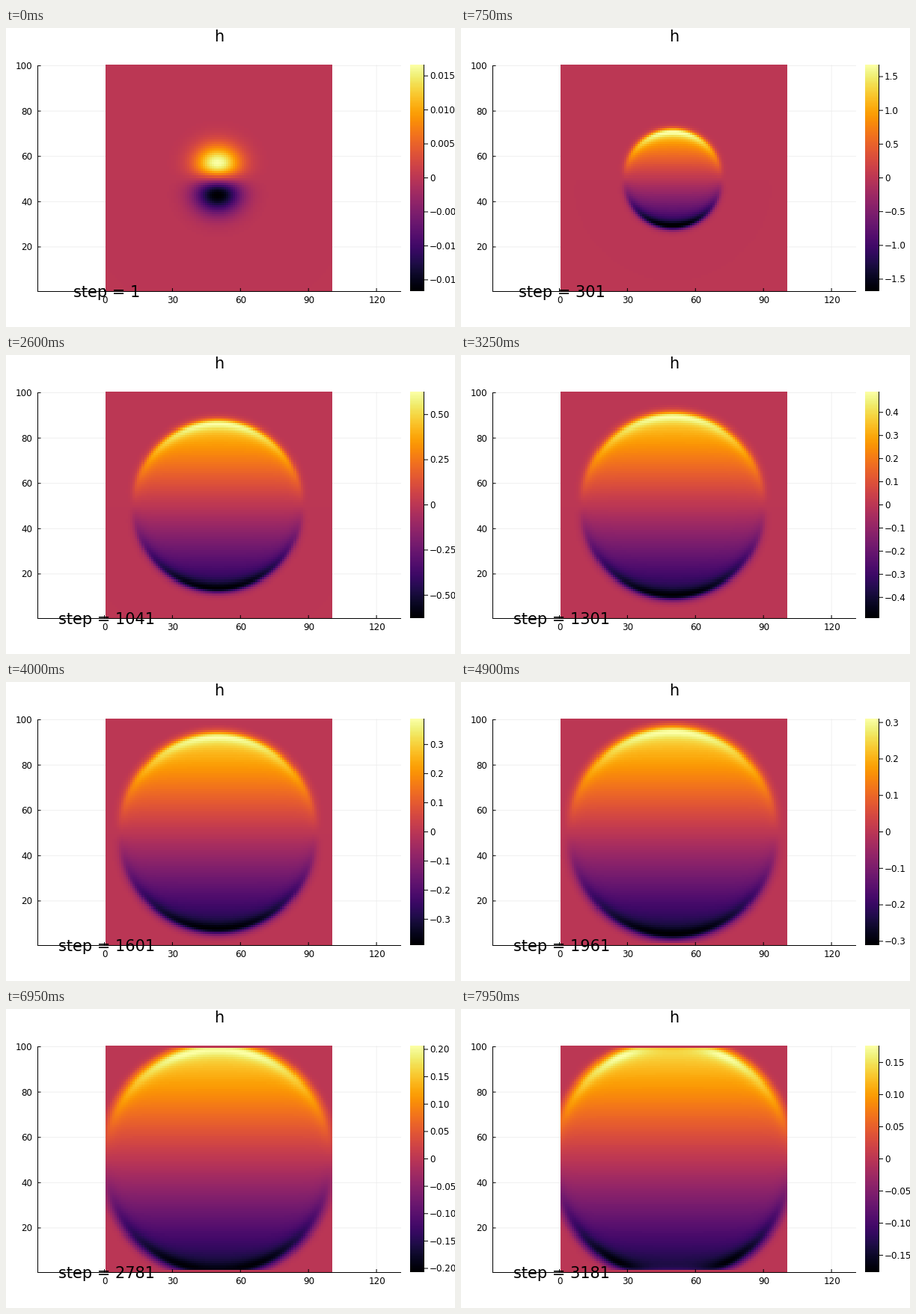
A matplotlib script for the animation above (8000 ms loop, 600 px wide and 400 px high).

```python
import numpy as np
import matplotlib.pyplot as plt
from matplotlib.animation import FuncAnimation

W, H, DPI = 600, 400, 100
FRAMES, INTERVAL = 160, 50
DT, STRIDE = 0.02, 20
TOP, BOTTOM = 49, 352
MID, HALF = 200.5, 151.5
CELL = 3.03
BLACK = "black"

plt.rcParams["font.family"] = "DejaVu Sans"

# time knots with the peak value and the radius of the peak
T = [0.02, 0.42, 1, 2, 4, 6, 8, 11.62, 20.82, 32.02, 47.22, 55.62, 63.62]
PEAK = [0.01666, 0.345, 0.78, 1.3, 1.72, 1.68, 1.48, 1.144,
        0.627, 0.389, 0.2527, 0.2068, 0.1763]
RADIUS = [7.1, 7.6, 9.2, 12.4, 16.6, 20.1, 23.3, 28, 35.6, 41.5, 45.9, 47.7, 49.8]
# share of the peak reached by the linear interior
T_CORE = [11.62, 20.82, 32.02, 47.22, 63.62]
CORE = [0.60, 0.68, 0.73, 0.77, 0.72]

cells = np.arange(1, 101)
X, Y = np.meshgrid(cells - 50.0, cells - 50.0)
R = np.hypot(X, Y)
COS = Y / np.maximum(R, 1e-9)
WALL = np.minimum(cells - 1, 100 - cells)[:, None]


def smooth(x):
    x = np.clip(x, 0, 1)
    return x * x * (3 - 2 * x)


def peak_at(t):
    return np.exp(np.interp(np.log(t), np.log(T), np.log(PEAK)))


def field(t):
    """Field scaled to its own peak."""
    if t > 11.62:
        rp = np.interp(np.log(t), np.log(T), RADIUS)
    else:
        rp = np.interp(t, T, RADIUS)
    soft = R / rp * np.exp(0.5 - 0.5 * (R / rp) ** 2)

    core = np.interp(t, T_CORE, CORE)
    sharp = smooth((t - 0.5) / 4.5)
    width = np.interp(t, [11.62, 55.62], [0.6, 1.0])
    blur = width + 2 * (1 - sharp)
    spike = np.exp(np.minimum((R - rp) / 1.8, 3))
    front = 1 / (1 + np.exp(np.clip((R - rp - 2.4 * width) / blur, -50, 50)))
    ring = (core * R / rp + (1 - core) * spike) * front

    v = ((1 - sharp) * soft + sharp * ring) * COS
    damp = 0.5 * smooth((t - 50) / 14)
    v = v * (1 - damp * np.exp(-WALL / 1.5))
    v[[0, -1]] = 0
    return v / np.abs(v).max()


def tick_step(m):
    for k in range(-4, 2):
        for base in (1, 2.5, 5):
            step = base * 10.0 ** k
            if m / step < 5:
                return step
    return 100.0


def decimals(step):
    n = 0
    while abs(step * 10 ** n - round(step * 10 ** n)) > 1e-6:
        n += 1
    return n


def px(u):
    return 131.5 + CELL * u


def py(u):
    return BOTTOM - (u - 0.5) * CELL


fig = plt.figure(figsize=(W / DPI, H / DPI), dpi=DPI, facecolor="white")
ax = fig.add_axes([0, 0, 1, 1])
ax.axis("off")


def line(xs, ys, color=BLACK, width=1.0, z=3):
    return ax.plot(xs, ys, color=color, lw=width * 72 / DPI, zorder=z,
                   solid_capstyle="butt", snap=False)[0]


def label(x, y, s, size=8.57, ha="center"):
    return ax.text(x, y, s, fontsize=size, ha=ha, va="baseline",
                   color=BLACK, zorder=5)


for u in (0, 30, 60, 90, 120):
    x = px(u)
    line([x, x], [TOP, BOTTOM], "#ececec", 0.8, 0)
    line([x, x], [BOTTOM, BOTTOM - 4])
    label(x + 0.5, 368.3, str(u))
for u in (20, 40, 60, 80, 100):
    y = py(u)
    line([42, 528], [y, y], "#ececec", 0.8, 0)
    line([42, 46.5], [y, y])
    label(35, y + 4.4, str(u), ha="right")
line([42.5, 42.5], [TOP + 1, BOTTOM + 1])
line([42, 528], [352.5, 352.5])

image = ax.imshow(np.zeros((100, 100)), cmap="inferno", vmin=-1, vmax=1,
                  extent=(133, 436, BOTTOM, TOP), origin="lower",
                  interpolation="nearest", aspect="auto", zorder=1)
ax.imshow(np.linspace(1, -1, BOTTOM - TOP)[:, None], cmap="inferno",
          vmin=-1, vmax=1, extent=(540, 558, BOTTOM, TOP),
          interpolation="nearest", aspect="auto", zorder=1)
line([558.5, 558.5], [TOP, BOTTOM])

label(285, 18, "h", 15)
caption = label(134.5, 360, "", 15)
bar_ticks = [(line([558, 564], [MID, MID]), label(566, MID, "", ha="left"))
             for _ in range(9)]

# origin="lower" flips the extent, so its rows run upward from BOTTOM
ax.set_xlim(0, W)
ax.set_ylim(H, 0)


def draw(i):
    n = 1 + STRIDE * i
    t = n * DT
    m = peak_at(t)
    image.set_data(field(t))
    caption.set_text(f"step = {n}")

    step = tick_step(m)
    digits = decimals(step)
    for k, (mark, text) in zip(range(-4, 5), bar_ticks):
        value = k * step
        shown = abs(value) <= m
        mark.set_visible(shown)
        text.set_visible(shown)
        y = MID - HALF * value / m
        mark.set_ydata([y, y])
        text.set_y(y + 4.4)
        name = f"{value:.{digits}f}" if k else "0"
        text.set_text(name.replace("-", "\u2212"))
    return []


anim = FuncAnimation(fig, draw, frames=FRAMES, interval=INTERVAL,
                     init_func=lambda: draw(0), repeat=True, repeat_delay=0)
plt.show()
```
